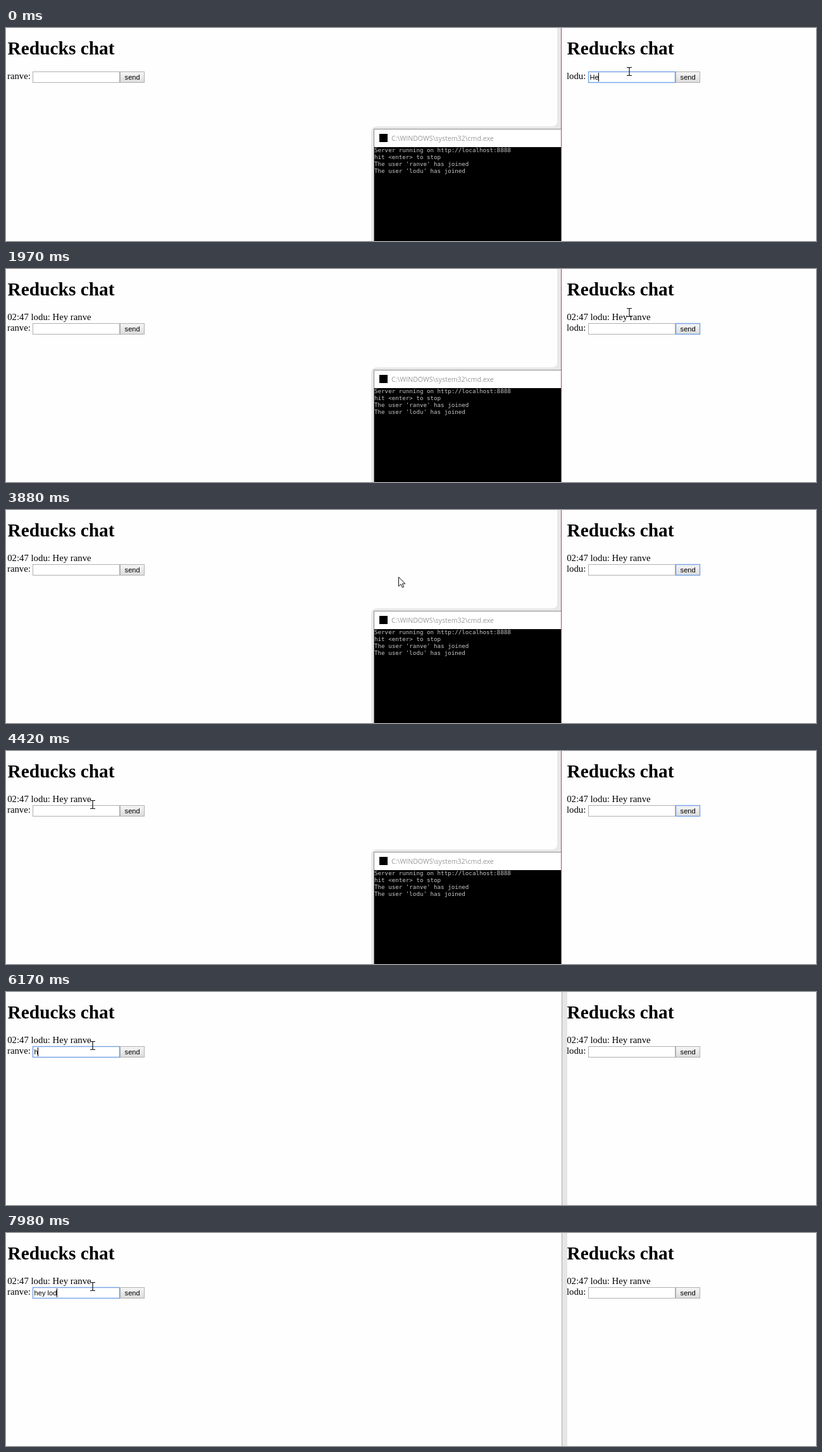
Recreate the animation shown at these times as an HTML page. Size 1280x338 px, loop 8000 ms.

```html
<!DOCTYPE html>
<html lang="en">
<head>
<meta charset="utf-8">
<title>Chat demo</title>
<style>
html, body { margin: 0; width: 100%; height: 100%; overflow: hidden; background: #fefefe; }
svg { display: block; }
text { white-space: pre; }
.title { font: bold 29.4px "Liberation Serif", serif; }
.line { font: 14.77px "Liberation Serif", serif; }
.ui { font: 11.08px "Liberation Sans", sans-serif; }
.bar { font: 10.6px "Open Sans", sans-serif; fill: #999; }
.term { font: 9.2px "DejaVu Sans Mono", monospace; fill: #c8c8c8; }
</style>
</head>
<body>
<svg id="stage" width="1280" height="338" viewBox="0 0 1280 338">
  <defs>
    <linearGradient id="face" x2="0" y2="1">
      <stop offset="0" stop-color="#f6f6f6"/>
      <stop offset="1" stop-color="#dcdcdc"/>
    </linearGradient>
  </defs>
  <rect width="1280" height="338" fill="#fefefe"/>
</svg>
<script>
const LOOP = 8000;
const LEFT_USER = "ranve", RIGHT_USER = "lodu";
const GREETING = "Hey " + LEFT_USER;
const MESSAGE = `02:47 ${RIGHT_USER}: ${GREETING}`;
const SENT_AT = 1970, SWITCH_AT = 4540;
const INPUT_W = 138, BUTTON_W = 39, BOX_H = 18;
const stage = document.getElementById("stage");

function add(parent, tag, attrs, content = "") {
  const node = document.createElementNS("http://www.w3.org/2000/svg", tag);
  for (const key in attrs) node.setAttribute(key, attrs[key]);
  node.textContent = content;
  return parent.appendChild(node);
}
const label = (parent, kind, x, y, content) =>
  add(parent, "text", { class: kind, x, y }, content);
const show = (node, on) => node.setAttribute("visibility", on ? "visible" : "hidden");

// Value of the last step that has begun: [start, value]
function at(steps, t) {
  let value = steps[0][1];
  for (const [start, v] of steps) if (t >= start) value = v;
  return value;
}

// Windows behind the panes
const idle = add(stage, "g", {});
add(idle, "rect", { x: 879, width: 8, height: 338, fill: "#e6e6e6" });
add(idle, "rect", { x: 878, width: 1, height: 338, fill: "#ababab" });

const busy = add(stage, "g", {});
add(busy, "path", { d: "M871 0V148Q871 156 863 156H586Q577 156 577 166V338H877V0Z", fill: "#e8e8e8" });
add(busy, "rect", { x: 581, y: 160, width: 296, height: 178, fill: "#8c8c8c" });
add(busy, "rect", { x: 582, y: 161, width: 295, height: 28, fill: "#fff" });
add(busy, "rect", { x: 582, y: 189, width: 295, height: 149, fill: "#000" });
add(busy, "rect", { x: 590, y: 168, width: 13, height: 13, fill: "#000" });
label(busy, "bar", 609, 179, "C:\\WINDOWS\\system32\\cmd.exe");
[
  "Server running on http://localhost:8888",
  "hit <enter> to stop",
  `The user '${LEFT_USER}' has joined`,
  `The user '${RIGHT_USER}' has joined`
].forEach((row, i) => label(busy, "term", 582, 197 + i * 11, row));
add(busy, "rect", { x: 877, width: 1, height: 338, fill: "#b0407c" });

function makePane(x, user, inputX) {
  label(stage, "title", x + .6, 42, "Reducks chat");
  const message = label(stage, "line", x + .2, 81, MESSAGE);
  const form = add(stage, "g", {});
  label(form, "line", x, 81, user + ":");
  const buttonX = inputX + INPUT_W, textX = inputX + 2.6;
  const box = (left, w, fill) =>
    add(form, "rect", { x: left + .5, y: 69.5, width: w - 1, height: BOX_H - 1, fill });
  const button = box(buttonX, BUTTON_W, "url(#face)");
  const input = box(inputX, INPUT_W, "#fff");
  label(form, "ui", buttonX + 7.6, 82, "send");
  const typed = label(form, "ui", textX, 82, "");
  const caret = add(form, "rect", { y: 71, width: 1, height: 14 });

  const focus = (node, on) => {
    node.setAttribute("stroke", on ? "#74a2e6" : "#b0b0b0");
    node.setAttribute("stroke-width", on ? 1.4 : 1);
  };
  return (sent, value, focused, caretOn) => {
    show(message, sent);
    form.setAttribute("transform", `translate(0 ${sent ? 17 : 0})`);
    focus(input, focused === "input");
    focus(button, focused === "button");
    typed.textContent = value;
    const end = textX + (value ? typed.getComputedTextLength() : 0);
    caret.setAttribute("x", Math.floor(end));
    show(caret, caretOn);
  };
}
const drawLeft = makePane(2, LEFT_USER, 42);
const drawRight = makePane(886, RIGHT_USER, 920);

// Mouse pointers
const mouse = add(stage, "g", {});
const beam = add(mouse, "path", {
  d: "M-4 -6.5H-1L0 -5.5L1 -6.5H4M0 -6V6M-4 6.5H-1L0 5.5L1 6.5H4",
  fill: "none", stroke: "#111", "stroke-width": 1.2
});
const arrow = add(mouse, "path", {
  d: "M.5 .5V15L4 11.7L6.4 17L8.6 16L6.3 11H10.8Z", fill: "#fff", stroke: "#111"
});

const rightText = [
  [0, 2], [150, 4], [580, 5], [710, 6], [860, 7], [980, 9], [SENT_AT, 0]
].map(([t, n]) => [t, GREETING.slice(0, n)]);

const [a, b, c, d] = RIGHT_USER;
const leftText = [
  [0, ""], [6170, "h"], [6290, "hey"], [6440, "hey "],
  [6840, "hey " + a], [6970, "hey " + a + b],
  [7120, "hey " + a + b + d], [7240, "hey " + a + b + d + c],
  [7860, "hey " + a + b], [7980, "hey " + a + b + c]
];
const leftCaret = [[0, false], [4690, true], [5060, false], [5610, true]];
const leftFocus = [[0, ""], [4690, "input"]];
const rightFocus = [[0, "input"], [1380, "button"], [SWITCH_AT, ""]];
const mousePath = [
  [0, [985, 69]], [2470, [968, 66]], [2620, [970, 68]], [2770, [975, 70]],
  [2890, [1002.5, 73.5]], [3050, [1002.5, 77.5]], [3200, [984, 92]],
  [3880, [620, 106, true]], [4000, [258, 101, true]],
  [4160, [170, 92]], [4300, [150, 88]], [4420, [137, 85]]
];

function draw(t) {
  const sent = t >= SENT_AT, switched = t >= SWITCH_AT;
  show(busy, !switched);
  show(idle, switched);
  drawLeft(sent, at(leftText, t), at(leftFocus, t), at(leftCaret, t));
  const focused = at(rightFocus, t);
  drawRight(sent, at(rightText, t), focused, focused === "input");
  const [x, y, isArrow] = at(mousePath, t);
  mouse.setAttribute("transform", `translate(${x} ${y})`);
  show(beam, !isArrow);
  show(arrow, isArrow);
}

const start = performance.now();
function tick() {
  draw((performance.now() - start) % LOOP);
  requestAnimationFrame(tick);
}
tick();
</script>
</body>
</html>
```
